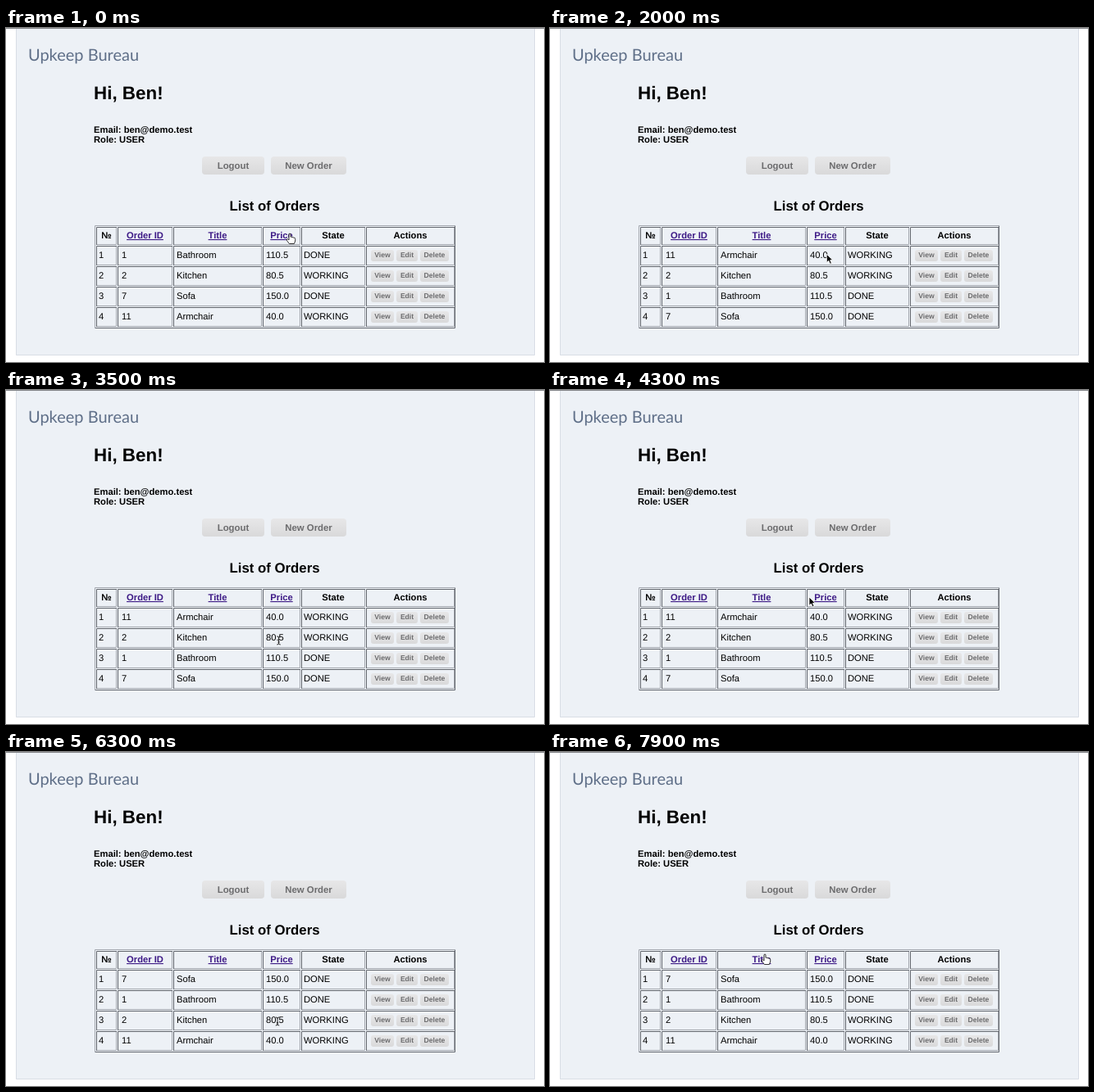
Animation, 656 px wide and 408 px high, one loop 8 s. Source, as an HTML page:

```html
<!DOCTYPE html>
<html lang="en">
<head>
<meta charset="utf-8">
<title>List of Orders</title>
<style>
  html, body { margin: 0; width: 100%; height: 100%; overflow: hidden; background: #fff; }
  svg { display: block; width: 656px; height: 408px; font-family: "Liberation Sans", Arial, sans-serif; font-size: 11.2px; text-rendering: geometricPrecision; }
  .bold { font-weight: 700; }
  .mid { text-anchor: middle; }
  .brand { font: 400 20px Lato, sans-serif; fill: #5f6f88; }
  .link { fill: #3d1a86; text-decoration: underline; }
  .dark, .light { fill: none; stroke: #62666d; }
  .light { stroke: #a3a7ae; }
  .label { font-weight: 700; fill: #6c6c6e; text-anchor: middle; }
</style>
</head>
<body>
<svg viewBox="0 0 656 408">
  <defs>
    <linearGradient id="face" x2="0" y2="1">
      <stop offset="0" stop-color="#e7e7e8"/>
      <stop offset="1" stop-color="#d9d9da"/>
    </linearGradient>
  </defs>
  <rect x="12" y="0" width="633" height="400" fill="#edf1f6"/>
  <path d="M12.5 1V399.5H644.5V1" fill="none" stroke="#d8dde5"/>
  <rect width="656" height="1" fill="#85878b"/>

  <text class="brand" x="27" y="40">Upkeep Bureau</text>
  <text class="bold" x="107" y="87" font-size="22.4">Hi, Ben!</text>
  <text class="bold" x="107" y="128">Email: ben@demo.test</text>
  <text class="bold" x="107" y="140.3">Role: USER</text>
  <text class="bold mid" x="327.5" y="223" font-size="16.8">List of Orders</text>

  <g id="page"></g>
  <g id="rows"></g>

  <g id="cursor">
    <path id="arrow" d="M0 0V10.2L2.4 8L4.2 12L6 11.2L4.3 7.3H7.4Z" fill="#000" stroke="#fff" stroke-width=".8"/>
    <path id="hand" d="M-1 0.6Q0 -.6 1 .6V4.2Q2.2 3.6 2.9 4.7Q4.2 4.1 4.8 5.2Q6.6 4.8 6.7 6.6V9L5.4 12.5H-.6L-3.7 8.3Q-4.2 6.4 -2.4 6.8L-1 8Z" fill="#fff" stroke="#222" stroke-width=".9"/>
    <path id="beam" d="M-2.2 -5Q0 -5 0 -3.6Q0 -5 2.2 -5M0 -4V4M-2.2 5Q0 5 0 3.6Q0 5 2.2 5M-1.2 2H1.2" fill="none" stroke="#222"/>
  </g>
</svg>
<script>
const $ = id => document.getElementById(id);
const LOOP = 8000, STEP = 100;

const text = (x, y, str, cls = "", size = 11.2) =>
  `<text x="${x}" y="${y}" class="${cls}" font-size="${size}">${str}</text>`;
// bevelled frame: one shade for the top and left, one for the bottom and right
const bevel = (x, y, w, h, topLeft, bottomRight) =>
  `<path class="${bottomRight}" d="M${x} ${y + h - .5}h${w - .5}V${y}"/>` +
  `<path class="${topLeft}" d="M${x + .5} ${y + h}V${y + .5}H${x + w}"/>`;
const cell = (x, y, w, h) => bevel(x, y, w, h, "dark", "light");
const button = (x, y, w, h, r, str, base, size) =>
  `<rect x="${x}" y="${y}" width="${w}" height="${h}" rx="${r}" fill="url(#face)"/>` +
  text(x + w / 2, base, str, "label", size);

// left edge, width, heading, is a sort link
const columns = [
  [110, 25, "№"], [136, 67, "Order ID", true], [204, 108, "Title", true],
  [313, 46, "Price", true], [360, 78, "State"], [439, 108, "Actions"]
];
const textX = [113, 141, 208, 317, 363];

let page = button(239, 157, 76, 22, 4, "Logout", 172, 11.4) +
  button(323, 157, 92, 22, 4, "New Order", 172, 11.4) +
  bevel(108, 241, 440, 126, "light", "dark");
for (const [x, w, name, link] of columns) {
  page += cell(x, 243, w, 22) +
    text(x + w / 2, 257, name, "bold mid" + (link ? " link" : ""));
  for (let r = 0; r < 4; r++) page += cell(x, 266 + 25 * r, w, 24);
}
for (let r = 0; r < 4; r++) {
  const y = 271 + 25 * r;
  page += button(445, y, 28, 14, 3, "View", y + 9, 8.6) +
    button(476, y, 26, 14, 3, "Edit", y + 9, 8.6) +
    button(505, y, 35, 14, 3, "Delete", y + 9, 8.6);
}
$("page").innerHTML = page;

const orders = [
  [1, "Bathroom", "110.5", "DONE"], [2, "Kitchen", "80.5", "WORKING"],
  [7, "Sofa", "150.0", "DONE"], [11, "Armchair", "40.0", "WORKING"]
];
const byPrice = [...orders].sort((a, b) => a[2] - b[2]);
const sorts = [[0, orders], [1000, byPrice], [5000, [...byPrice].reverse()]];

// time, x, y, cursor shape until the next stop
const stops = [
  [0, 346, 251, "hand"], [500, 346, 251, "hand"], [900, 338, 251, "hand"],
  [1000, 338, 251, "arrow"], [1700, 338, 251, "arrow"], [2200, 337, 290, "arrow"],
  [2600, 337, 323, "beam"], [3300, 337, 323, "beam"], [3600, 331, 300, "arrow"],
  [4200, 316, 253, "arrow"], [4400, 316, 253, "arrow"], [4600, 327, 254, "hand"],
  [5000, 327, 254, "arrow"], [5200, 327, 262, "arrow"], [5400, 327, 262, "arrow"],
  [6000, 331, 329, "beam"], [6700, 331, 329, "beam"], [6900, 322, 312, "arrow"],
  [7600, 262, 252, "hand"], [7800, 262, 247, "hand"], [LOOP, 262, 247, "hand"]
];

let shown;
function draw(t) {
  const list = sorts.findLast(s => s[0] <= t)[1];
  if (list !== shown) {
    shown = list;
    $("rows").innerHTML = list.map((order, r) =>
      [r + 1, ...order].map((v, c) => text(textX[c], 281 + 25 * r, v)).join("")).join("");
  }
  const i = stops.findLastIndex(s => s[0] <= t);
  const [t0, x0, y0, shape] = stops[i], [t1, x1, y1] = stops[i + 1];
  const p = (t - t0) / (t1 - t0), e = p * p * (3 - 2 * p);
  $("cursor").setAttribute("transform", `translate(${x0 + (x1 - x0) * e} ${y0 + (y1 - y0) * e})`);
  for (const id of ["arrow", "hand", "beam"]) $(id).style.display = id === shape ? "" : "none";
}

const start = performance.now();
function tick() {
  const t = (performance.now() - start) % LOOP;
  draw(Math.floor(t / STEP) * STEP);
  requestAnimationFrame(tick);
}
tick();
</script>
</body>
</html>
```
